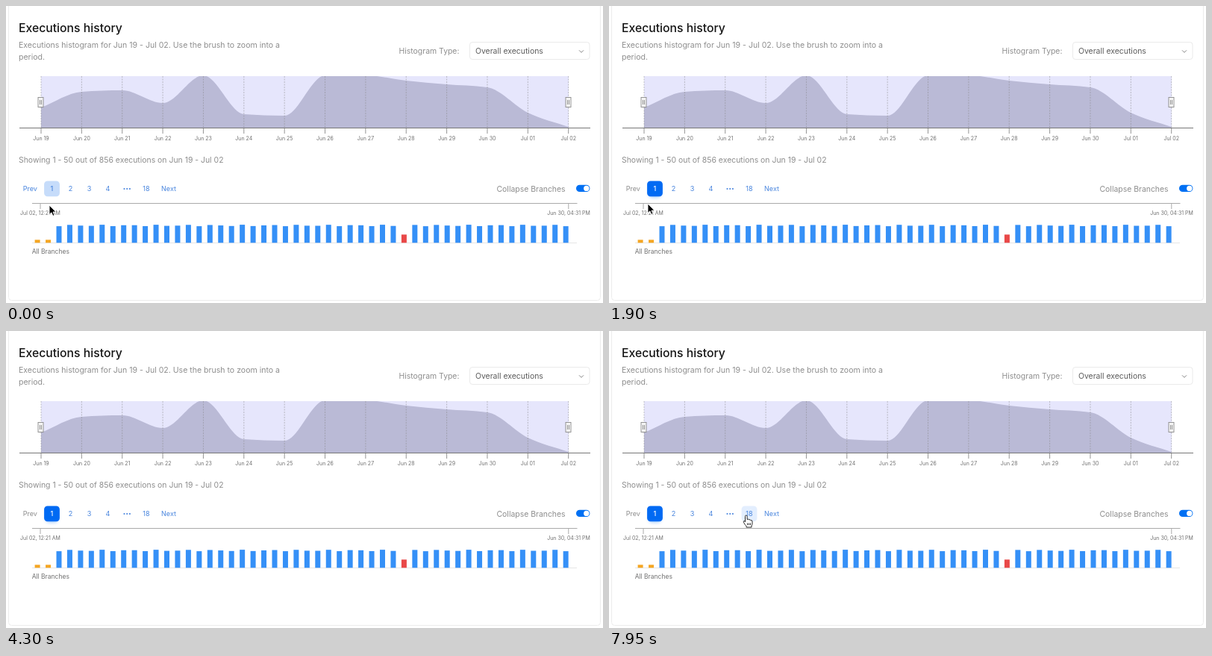
Animation, 800 px wide and 398 px high, one loop 8 s. Source, as an HTML page:

```html
<!DOCTYPE html>
<html lang="en">
<head>
<meta charset="utf-8">
<title>Executions history</title>
<style>
  html, body { margin: 0; width: 100%; height: 100%; overflow: hidden; background: #fff; }
  svg { display: block; width: 800px; height: 398px; font: 10.43px Inter, sans-serif; fill: #8e8e8e; }
  .title { font-size: 15.75px; font-weight: 500; fill: #151515; }
  .lead { font-size: 10.55px; }
  .page { font-size: 9.1px; text-anchor: middle; }
  .tick { font-size: 7px; text-anchor: middle; fill: #707070; }
  .line { fill: none; stroke: #888; }
</style>
</head>
<body>
<svg viewBox="0 0 800 398">
  <path class="line" style="stroke:#ececec" d="M3.5 0V390.5q0 4 4 4H792.5q4 0 4-4V0"/>

  <text class="title" x="17" y="35">Executions history</text>
  <text class="lead" x="17" y="56">Executions histogram for Jun 19 - Jul 02. Use the brush to zoom into a</text>
  <text class="lead" x="17" y="72">period.</text>
  <text x="526.5" y="64.3">Histogram Type:</text>
  <rect x="621.5" y="48.5" width="160.5" height="23" rx="3.5" fill="#fff" stroke="#eaeaea"/>
  <text x="629" y="64.3" fill="#5c5c5c">Overall executions</text>
  <path class="line" d="M768 59.3l3 3 3-3"/>

  <clipPath id="plot"><rect x="47" y="94" width="707" height="70"/></clipPath>
  <rect x="47" y="94" width="707" height="70" fill="#e6e6fc"/>
  <path id="area" fill="#babad6" clip-path="url(#plot)"/>
  <g id="axis"></g>
  <path class="line" style="stroke:#777" d="M18 163.5H783"/>
  <g id="handles"></g>

  <text x="17" y="210">Showing 1 - 50 out of 856 executions on Jun 19 - Jul 02</text>

  <rect id="glow" x="53" y="238" width="17" height="19" rx="5" fill="#0070f3" style="filter:blur(2px)"/>
  <rect id="active" x="51.1" y="234.5" width="20.8" height="20.8" rx="4.5"/>
  <rect id="hover" x="177.6" y="234.5" width="20.8" height="20.8" rx="4.5" fill="#e3eefe"/>
  <g id="pages" fill="#4a86de"></g>
  <text x="657.5" y="248.5">Collapse Branches</text>
  <rect x="764" y="239.7" width="18.4" height="9.4" rx="4.7" fill="#0070f3"/>
  <circle cx="777.8" cy="244.4" r="3.7" fill="#fff"/>

  <path class="line" style="stroke:#aaa" d="M35 264.5H765.5M46 265v7M753.8 265v7"/>
  <text class="tick" x="46" y="280.4">Jul 02, 12:21 AM</text>
  <text class="tick" x="754" y="280.4">Jun 30, 04:31 PM</text>
  <path class="line" style="stroke:#e6e6e6" d="M35 317.5H765"/>
  <g id="bars"></g>
  <text x="34.7" y="332" style="font-size:8.5px;fill:#707070">All Branches</text>

  <defs><path id="caret" fill="none" d="M-3-6Q0-6 0-4Q0-6 3-6M0-4V5M-3 7Q0 7 0 5Q0 7 3 7M-1.5 2H1.5"/></defs>
  <g id="cursor" stroke-linejoin="round">
    <path id="arrow" d="M0 0V12.5L2.9 9.8 4.9 14.3 7 13.4 5.1 9H9Z" fill="#000" stroke="#fff" stroke-width=".9"/>
    <g id="beam">
      <use href="#caret" stroke="#fff" stroke-width="2.5"/>
      <use href="#caret" stroke="#444"/>
    </g>
    <path id="hand" fill="#fff" stroke="#111" stroke-width=".9" d="M-3.5-5.5q0-1.5 1.3-1.5t1.3 1.5v4q1.8-1.2 2.5.5 1.7-.9 2.2.7 2.2-.5 2.2 1.5v2.8q0 1.5-1 3V9H-2V7.5Q-4 5.5-5.5 2.5q-.8-1.7.4-2 .9-.1 1.6 1.3ZM-.5 3.5V6M1.5 3.5V6M3.5 3.5V6"/>
  </g>
</svg>
<script>
const $ = id => document.getElementById(id);
const LOOP = 8000, LEFT = 47, STEP = 54.36;

function add(parent, tag, attrs, text = '') {
  const el = document.createElementNS('http://www.w3.org/2000/svg', tag);
  for (const key in attrs) el.setAttribute(key, attrs[key]);
  el.textContent = text;
  return $(parent).appendChild(el);
}

// Monotone cubic through evenly spaced points
function areaPath(ys) {
  const last = ys.length - 1;
  const slope = ys.map((y, i) => {
    const a = y - ys[i - 1], b = ys[i + 1] - y;
    if (!i) return b;
    if (i === last) return a;
    return (Math.sign(a) + Math.sign(b)) * Math.min(Math.abs(a), Math.abs(b), Math.abs(a + b) / 4);
  });
  let d = `M${LEFT} 164V${ys[0]}`;
  for (let i = 0; i < last; i++) {
    const x = LEFT + i * STEP;
    d += `C${x + STEP / 3} ${ys[i] + slope[i] / 3} ${x + STEP * 2 / 3} ${ys[i + 1] - slope[i + 1] / 3} ${x + STEP} ${ys[i + 1]}`;
  }
  return d + 'V164Z';
}
$('area').setAttribute('d', areaPath([136, 115, 113, 130, 93, 145, 147, 93, 93, 100, 105, 109, 143, 162]));

for (let i = 0; i < 14; i++) {
  const x = LEFT + i * STEP;
  const day = i < 12 ? `Jun ${19 + i}` : `Jul 0${i - 11}`;
  add('axis', 'path', { d: `M${x} 94V163`, class: 'line', 'stroke-dasharray': '2 1.5', 'stroke-width': .7, opacity: .7 });
  add('axis', 'path', { d: `M${x} 164v7`, class: 'line', 'stroke-width': .9 });
  add('axis', 'text', { x, y: 179.5, class: 'tick' }, day);
}

for (const x of [46.5, 753.5]) {
  add('handles', 'rect', { x: x - 3.5, y: 122.5, width: 7, height: 13, fill: '#f4f4f4', stroke: '#8a8a8a', 'stroke-width': .9 });
  add('handles', 'path', { d: `M${x - 1} 126v6M${x + 1} 126v6`, class: 'line', 'stroke-width': .9 });
}

for (let i = 0; i < 50; i++) {
  const pending = i < 2, failed = i === 34;
  const height = pending ? 4 : failed ? 11 : 23.2 + Math.sin(i * 2.4);
  add('bars', 'rect', {
    x: 38.6 + i * 14.45, y: 317.3 - height, width: 7, height,
    fill: pending ? '#f5a623' : failed ? '#e94848' : '#3590f7'
  });
}

const addPage = (label, x) => add('pages', 'text', { x, y: 248.2, class: 'page' }, label);
const prev = addPage('Prev', 32.3);
const [first] = [1, 2, 3, 4].map(n => addPage(n, 36.5 + 25 * n));
first.style.fontWeight = 500;
for (let i = -1; i < 2; i++) add('pages', 'circle', { cx: 162.2 + 3.7 * i, cy: 245, r: 1.1 });
addPage('18', 188);
addPage('Next', 218);

// Cursor waypoints: time, x, y
const route = [
  [0, 58, 267], [650, 110, 358], [1500, 114, 362], [1850, 52, 265], [2500, 52, 265], [2850, 63, 279],
  [3550, 63, 279], [4200, 250, 415], [7150, 230, 415], [7750, 186, 254], [LOOP, 186, 254]
];
const mix = (a, b, k) => a + (b - a) * k;
const smooth = v => { v = Math.max(0, Math.min(1, v)); return v * v * (3 - 2 * v); };
const rgb = (from, to, k) => `rgb(${from.map((c, i) => Math.round(mix(c, to[i], k)))})`;
const LINK = [74, 134, 222];

function cursorAt(t) {
  const i = route.findIndex(p => p[0] > t);
  const [t0, x0, y0] = route[i - 1], [t1, x1, y1] = route[i];
  const k = smooth((t - t0) / (t1 - t0));
  return [mix(x0, x1, k), mix(y0, y1, k)];
}

function draw(t) {
  const k = smooth((t - 50) / 200);
  $('active').setAttribute('fill', rgb([198, 220, 250], [0, 106, 243], k));
  $('glow').style.opacity = k * .3;
  first.style.fill = rgb(LINK, [255, 255, 255], k);
  prev.style.fill = rgb(LINK, [142, 142, 142], k);
  $('hover').style.opacity = smooth((t - 7680) / 150);

  const [x, y] = cursorAt(t);
  const onPage = x > 177 && y < 260;
  const onText = x < 74 && y > 273 && y < 284 && t > 1850;
  const shape = onPage ? 'hand' : onText ? 'beam' : 'arrow';
  $('cursor').setAttribute('transform', `translate(${x} ${y})`);
  for (const id of ['arrow', 'beam', 'hand']) $(id).style.display = id === shape ? '' : 'none';
}

const start = performance.now();
(function tick() {
  draw((performance.now() - start) % LOOP);
  requestAnimationFrame(tick);
})();
</script>
</body>
</html>
```
